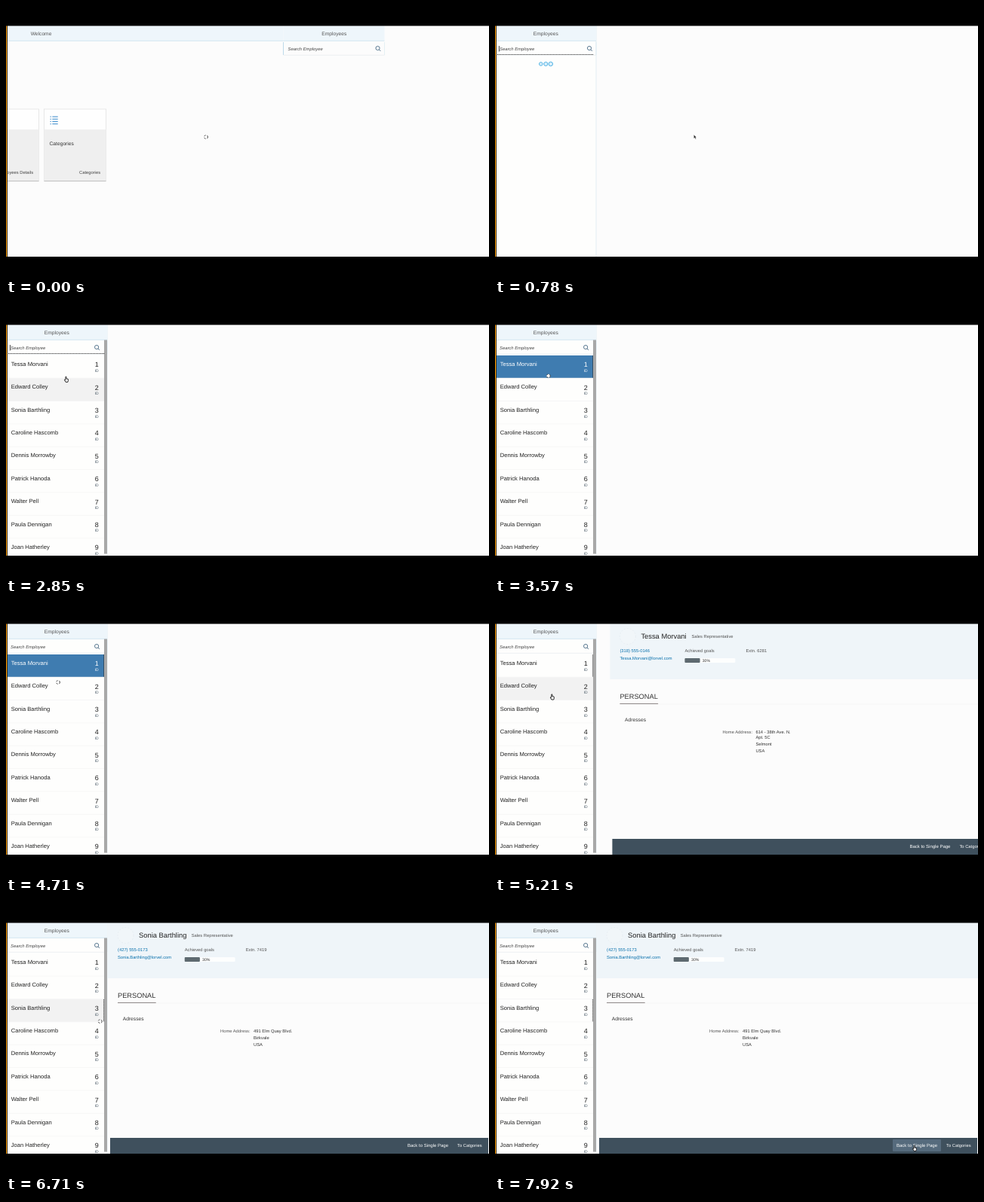
Write an HTML page that moves like this. It is 640 by 360 pixels and loops after 8 s.

```html
<!DOCTYPE html>
<html lang="en">
<head>
<meta charset="utf-8">
<title>Employees</title>
<style>
  html, body { margin: 0; width: 100%; height: 100%; overflow: hidden; background: #000; }
  svg { display: block; width: 100vw; height: 100vh; }
  text { font-family: "Liberation Sans", Arial, sans-serif; text-rendering: geometricPrecision; white-space: pre; }
</style>
</head>
<body>
<svg id="stage" viewBox="0 0 640 360"></svg>
<script>
const LOOP = 8000;
const ROW_TOP = 67, ROW_H = 30.36;
const people = [
  "Tessa Morvani", "Edward Colley", "Sonia Barthling", "Caroline Hascomb", "Dennis Morrowby",
  "Patrick Hanoda", "Walter Pell", "Paula Dennigan", "Joan Hatherley"
];
const details = [
  { name: people[0], shift: 0, phone: "(318) 555-0146", mail: "Tessa.Morvani@lorvel.com", ext: "Extn. 6281",
    lines: [["614 - 38th Ave. N.", 172], ["Apt. 5C", 179.3], ["Selmont", 188], ["USA", 196.8]] },
  { name: people[2], shift: 2.7, phone: "(427) 555-0173", mail: "Sonia.Barthling@lorvel.com", ext: "Extn. 7419",
    lines: [["491 Elm Quay Blvd.", 172], ["Birkvale", 181], ["USA", 189.8]] }
];

// time, x, y of the pointer
const path = [
  [0, 265, 174], [900, 265, 174], [1640, 258, 172], [1780, 258, 172], [2570, 88, 102], [2850, 80, 99],
  [3070, 72, 88], [3350, 72, 88], [3920, 69, 104], [4850, 69, 104], [5640, 84, 147], [6420, 84, 147],
  [6710, 124, 157], [7210, 480, 288], [7350, 520, 316], [7500, 520, 316], [7920, 556, 326]
];
// start time, value
const pointer = [[0, "ring"], [420, "arrow"], [2420, "hand"], [3420, "ring"], [4990, "hand"],
  [6070, "ring"], [6860, "arrow"], [7500, "hand"]];
const hover = [[0, -1], [2500, 1], [2920, 0], [3420, -1], [5130, 1], [5400, 2], [6790, -1]];
const focus = [[0, -1], [3420, 0], [6070, 2]];

const text = (s, x, y, size, fill = "#444", extra = "") =>
  `<text x="${x}" y="${y}" font-size="${size}" fill="${fill}" ${extra}>${s}</text>`;
const rect = (x, y, w, h, fill, extra = "") =>
  `<rect x="${x}" y="${y}" width="${w}" height="${h}" fill="${fill}" ${extra}/>`;
const line = (x1, y1, x2, y2, stroke, extra = "") =>
  `<path d="M${x1} ${y1}L${x2} ${y2}" stroke="${stroke}" fill="none" ${extra}/>`;
const mid = 'text-anchor="middle"', end = 'text-anchor="end"';

function tile(x, label, foot) {
  return rect(x, 137, 82, 95.5, "#fefefe", 'stroke="#dedede" stroke-width=".7"') +
    rect(x, 164, 82, 68.5, "#efefef") + line(x, 232.6, x + 82, 232.6, "#b4b4b4", 'stroke-width=".8"') +
    text(label, x + 7, 185, 6.7, "#333") + text(foot, x + 74.5, 223.3, 5.8, "#444", end);
}

function listIcon(x, y) {
  return [0, 1, 2, 3].map(i => rect(x, y + i * 3.2, 1.3, 1.2, "#4a94cf") +
    rect(x + 2.8, y + i * 3.2, 7.4, 1.1, "#4a94cf")).join("");
}

function welcome() {
  return rect(0, 26, 640, 20, "#eef6fb") + line(0, 46.3, 640, 46.3, "#c9e0ee", 'stroke-width=".8"') +
    text("Welcome", 319, 39, 6.7, "#555", mid) +
    tile(234, "Employees", "Employees Details") + tile(323, "Categories", "Categories") + listIcon(331, 146.5);
}

function row(name, i) {
  const y = ROW_TOP + i * ROW_H;
  return `<g class="row">` + rect(2, y, 128, ROW_H - .4, "none", 'class="back"') +
    line(2, y + ROW_H - .2, 130, y + ROW_H - .2, "#f1f1f1", 'stroke-width=".6"') +
    text(name, 6.7, y + 14, 7.6, "#222") + text(i + 1, 122.8, y + 15.4, 9, "#222", end) +
    text("ID", 122.7, y + 21.9, 5, "#445562", end) +
    line(129.5, y + .5, 129.5, y + ROW_H - 1, "#222", 'class="dots" stroke-width="1" stroke-dasharray="1 1"') + `</g>`;
}

function master() {
  return `<g id="panel">` + rect(0, 26, 134, 307, "#fefefd") +
    line(134, 26, 134, 333, "#dcebf3", 'stroke-width=".8"') + `</g>` +
    rect(0, 26, 134, 20, "#eef6fb") + line(0, 46.3, 134, 46.3, "#c9e0ee", 'stroke-width=".8"') +
    text("Employees", 67.3, 39, 6.7, "#555", mid) +
    line(0, 48, 0, 65, "#bcd9ea") + line(134, 48, 134, 65, "#dcebf3", 'stroke-width=".8"') +
    line(0, 65.3, 134, 65.3, "#dfe6ea", 'stroke-width=".6"') +
    text("Search Employee", 6, 59, 5.85, "#444", 'font-style="italic"') +
    `<g id="lens" fill="none" stroke="#345a78" stroke-width=".8"><circle cx="-.6" cy="56" r="2.6"/><path d="M1.3 58L3.3 60"/></g>` +
    `<g id="field">` + line(3, 64.5, 131, 64.5, "#222", 'stroke-width="1" stroke-dasharray="1 1"') +
    line(5.5, 53, 5.5, 60.5, "#222", 'stroke-width=".8"') + `</g>` +
    `<g id="busy" fill="#d9effa" stroke="#55b5e6" stroke-width="1">` +
    [60.8, 67.3, 73.8].map(x => `<circle cx="${x}" cy="77" r="2.6"/>`).join("") + `</g>` +
    `<g id="list">` + people.map(row).join("") + rect(130, 46.5, 4, 284, "#a8a8a8") + `</g>`;
}

function person(d) {
  const s = d.shift;
  return `<g class="person">` + text(d.name, 176, 45.5, 9.35, "#222") +
    text("Sales Representative", 243 + s, 45.3, 5.8, "#555") +
    text(d.phone, 148, 64, 5.8, "#0b72ad") + text(d.mail, 148, 74, 5.75, "#0b72ad") +
    text("Achieved goals", 234 + s, 63.7, 5.8, "#555") + text(d.ext, 315 + s, 63.9, 5.8, "#555") +
    rect(234 + s, 72, 67, 6, "#fdfefe", 'rx="1.5"') +
    rect(234 + s, 72, 20.2, 6, "#5e6a70", 'rx="1"') + text("30%", 257.3 + s, 77, 5.2, "#333") +
    d.lines.map(([t, y]) => text(t, 328, y, 5.8, "#333")).join("") + `</g>`;
}

function detail() {
  return rect(135, 26, 505, 74, "#eff5f9") +
    `<circle cx="158.5" cy="43" r="10.5" fill="#f1f6f9" stroke="#e3eaee" stroke-width=".7" stroke-dasharray="2 2"/>` +
    text("PERSONAL", 148, 126.2, 9.25, "#333") + line(148, 133, 640, 133, "#f2f2f2", 'stroke-width=".6"') +
    line(148, 132.5, 198.7, 132.5, "#8f8888", 'stroke-width="1"') +
    text("Adresses", 154.7, 155.9, 6.7, "#333") + text("Home Address:", 284, 172, 5.8, "#555") +
    details.map(person).join("") +
    rect(138, 312, 501, 21, "#3f505d") + rect(527, 314, 64, 16, "#566b7d", 'id="hot" rx="1"') +
    text("Back to Single Page", 532, 324.2, 6, "#fff") + text("To Catgories", 598, 324.2, 5.8, "#fff");
}

// pointer shapes, centred on 0,0
const shapes =
  `<circle class="cur" id="ring" r="2.4" fill="#fff" stroke="#333" stroke-width=".9" stroke-dasharray="2.2 1.6"/>` +
  `<path class="cur" id="arrow" d="M-1.6-3V2L-.4 1L.7 3L1.5 2.6L.6.7L2 .6Z" fill="#222" stroke="#fff" stroke-width=".4"/>` +
  `<path class="cur" id="hand" d="M-1-3.6Q-.4-4.1 0-3.5V-1.2L2.3-.5Q2.8 1.5 1.9 3.4H-.9L-2.6.4Q-2-.3-1 .4Z" fill="#fff" stroke="#111" stroke-width=".9"/>`;

const $ = id => document.getElementById(id);
const all = sel => [...document.querySelectorAll(sel)];
$("stage").innerHTML =
  `<clipPath id="pane"><rect x="135" y="26" width="505" height="307"/></clipPath>` +
  rect(0, 0, 640, 360, "#fcfcfc") +
  `<g id="welcome">${welcome()}</g><g id="master">${master()}</g>` +
  `<g clip-path="url(#pane)"><g id="detail">${detail()}</g></g>` +
  rect(0, 26, 1, 307, "#ffa60f") + rect(1, 26, 1, 307, "#3a2600") +
  rect(0, 0, 640, 26.4, "#000") + rect(0, 333, 640, 27, "#000") +
  `<g id="pointer">${shapes}</g>`;

const rows = all(".row"), cards = all(".person"), cursors = all(".cur"), dots = all("#busy circle");
const show = (el, on) => el.style.display = on ? "" : "none";
const move = (el, x, y = 0) => el.setAttribute("transform", `translate(${x} ${y})`);
const clamp = v => Math.max(0, Math.min(1, v));
const smooth = v => v * v * (3 - 2 * v);
const stateAt = (steps, t) => steps.filter(s => s[0] <= t).pop()[1];

function pointAt(t) {
  const i = path.findIndex(p => p[0] > t);
  if (i < 0) return path[path.length - 1].slice(1);
  const [t0, x0, y0] = path[i - 1], [t1, x1, y1] = path[i];
  const k = (t - t0) / (t1 - t0);
  return [x0 + (x1 - x0) * k, y0 + (y1 - y0) * k];
}

function render(t) {
  const slide = 370 * Math.pow(1 - clamp(t / 300), 2);
  const loaded = t >= 1780;
  move($("master"), slide);
  move($("welcome"), slide - 640);
  show($("welcome"), slide > 0);
  show($("panel"), slide === 0);
  show($("field"), t >= 350 && t < 3420);
  show($("busy"), t >= 500 && !loaded);
  dots.forEach((d, i) => d.setAttribute("r", 2.4 + .35 * Math.sin((t - 1500) / 254 - i * .8)));
  show($("list"), loaded);
  move($("lens"), loaded ? 120.7 : 125.6);

  const over = stateAt(hover, t), marked = stateAt(focus, t);
  const pressed = t >= 3420 && t < 4850 ? 0 : -1;
  rows.forEach((r, i) => {
    const down = i === pressed;
    r.querySelector(".back").setAttribute("fill", down ? "#3f7cb0" : i === over ? "#f2f2f2" : "none");
    r.querySelectorAll("text").forEach((el, n) => el.setAttribute("fill", down ? "#fff" : n < 2 ? "#222" : "#445562"));
    show(r.querySelector(".dots"), i === marked);
  });

  show($("detail"), t >= 4900);
  move($("detail"), 505 * (1 - smooth(clamp((t - 4900) / 350))));
  const current = t < 6420 ? 0 : 1;
  cards.forEach((c, i) => show(c, i === current));
  show($("hot"), t >= 7640);

  const kind = stateAt(pointer, t);
  cursors.forEach(c => show(c, c.id === kind));
  move($("pointer"), ...pointAt(t));
}

const start = performance.now();
function tick() {
  render((performance.now() - start) % LOOP);
  requestAnimationFrame(tick);
}
tick();
</script>
</body>
</html>
```
